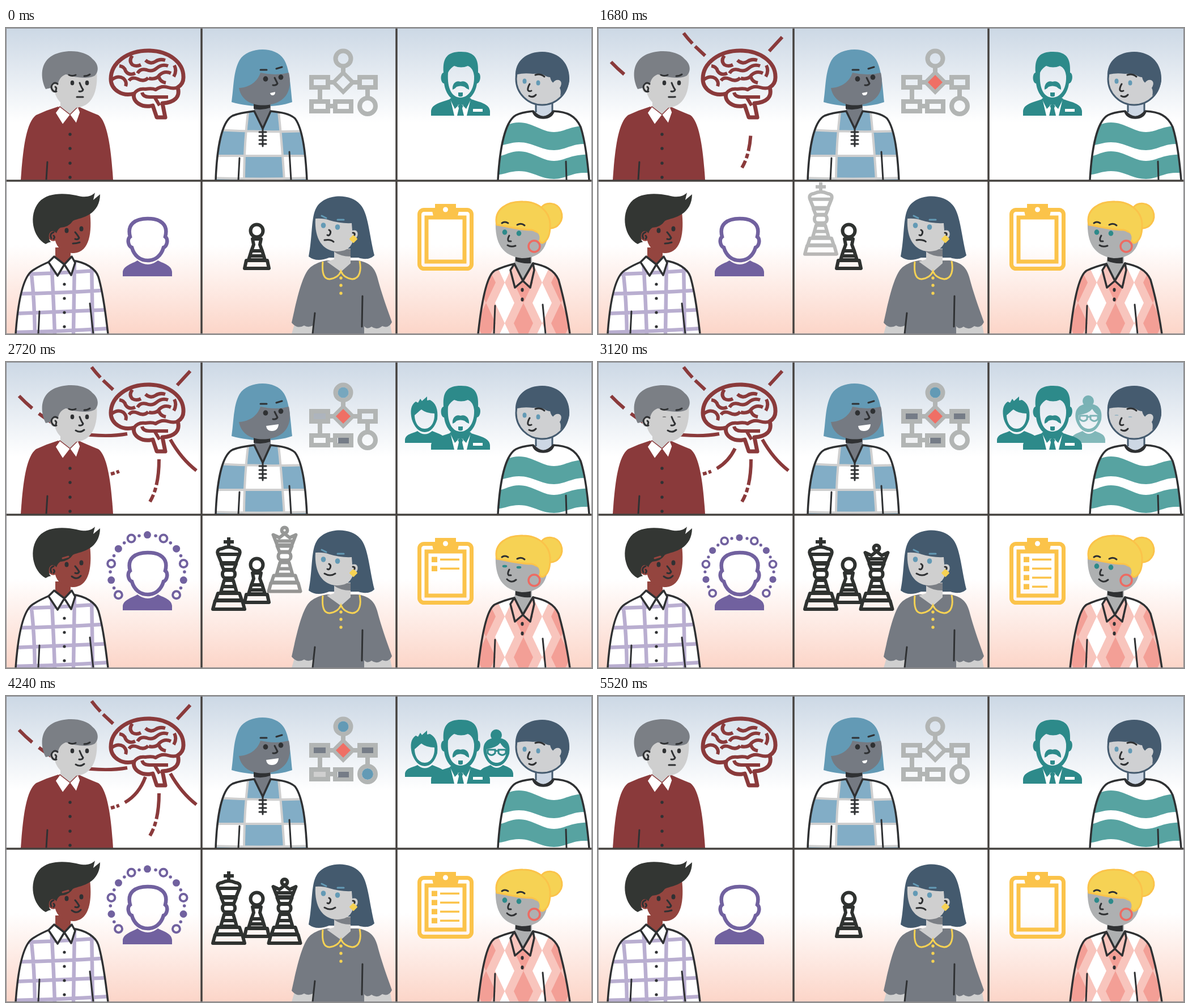
Recreate the animation shown at these times as an HTML page. Size 1034 px wide and 541 px high, loop 5760 ms.

```html
<!DOCTYPE html>
<html lang="en">
<head>
<meta charset="utf-8">
<title>Six people, six ideas</title>
<style>
html, body { margin: 0; width: 100%; height: 100%; overflow: hidden; background: #fff; }
svg { display: block; width: 100%; height: 100%; }
.ink, .outline { fill: none; stroke: #2f3133; stroke-width: 3; stroke-linecap: round; stroke-linejoin: round; }
.outline { stroke-width: 3.5; }
.dark { fill: #2f3133; }
.brain, .ray { fill: none; stroke: #8a3a3b; stroke-width: 6; stroke-linejoin: round; }
.flow { fill: none; stroke: #b2b5b4; stroke-width: 8; }
.teal { fill: #2d8a8a; fill-rule: evenodd; }
.white { fill: #fff; }
.piece { fill: none; stroke: #2f3230; stroke-width: 6; stroke-linejoin: round; }
.gold { fill: #fbc34a; }
</style>
</head>
<body>
<svg viewBox="0 0 1034 541" preserveAspectRatio="none">
<defs>
  <linearGradient id="sky" x2="0" y2="1"><stop stop-color="#ccd8e5"/><stop offset=".62" stop-color="#fff"/></linearGradient>
  <linearGradient id="glow" x2="0" y2="1"><stop offset=".42" stop-color="#fff"/><stop offset="1" stop-color="#fcd5c8"/></linearGradient>
  <pattern id="argyle" width="66" height="72" patternUnits="userSpaceOnUse" x="847" y="450">
    <path fill="#f8c5bd" d="M0 0H66V72H0Z"/>
    <path fill="#fff" d="M33 0L50 36 33 72 16 36Z"/>
    <path fill="#f39f96" d="M0 -36L17 0 0 36-17 0ZM66 -36L83 0 66 36 49 0ZM0 36L17 72 0 108-17 72ZM66 36L83 72 66 108 49 72Z"/>
  </pattern>
  <path id="tunic" d="M370 269C372 215 380 165 400 155C413 150 430 148 438 147L453 178 467 147C485 149 500 151 510 160C525 180 529 230 531 269"/>
  <path id="jumper" d="M868 269C871 215 880 165 900 154C910 149 922 148 930 147Q948 168 966 147C990 148 1005 155 1014 175C1022 200 1027 245 1029 269"/>
  <path id="shirt" d="M17 541C21 485 30 438 48 428C60 420 72 415 82 411L103 418 117 411C140 414 158 425 163 440C172 470 177 515 180 541"/>
  <path id="blouse" d="M833 541C839 485 848 438 862 429C875 423 888 419 897 417L912 447 930 416C950 420 967 427 975 445C985 480 992 520 995 541"/>
  <clipPath id="inTunic"><use href="#tunic"/></clipPath>
  <clipPath id="inJumper"><use href="#jumper"/></clipPath>
  <clipPath id="inShirt"><use href="#shirt"/></clipPath>
</defs>

<rect width="1034" height="270" fill="url(#sky)"/>
<rect y="270" width="1034" height="271" fill="url(#glow)"/>

<!-- brain -->
<g id="rays"></g>
<g class="brain">
  <path stroke-width="7" d="M226 116C205 122 185 109 185 90C185 61 215 40 251 40C286 40 314 60 313 88Q313 99 303 105C308 122 297 132 276 133L281 158H266L259 137C241 142 222 131 226 116Z"/>
  <path d="M187 91Q198 83 207 89Q214 95 211 103M200 67Q209 68 211 76Q217 85 228 80M223 49Q216 58 223 65Q230 69 238 65M217 93Q222 86 232 90Q244 96 251 88M232 80Q237 71 248 74Q258 78 266 71Q275 63 286 67M246 57Q255 65 264 59Q271 54 281 57M252 89Q265 92 271 83Q280 75 291 80M270 87Q272 95 282 97M297 66Q302 76 296 86M226 116Q233 106 246 108Q258 106 264 109Q275 101 286 105Q296 108 303 105M240 114Q242 122 253 122H286M262 122L271 137"/>
</g>

<!-- man in red cardigan -->
<path fill="#cfcfcf" d="M96 130H129V150L113 156 96 146Z"/>
<path fill="#8a3a3b" d="M26 269C30 215 35 168 53 154Q72 145 92 139L113 154 128 139Q143 146 163 154C180 166 186 220 189 269Z"/>
<path fill="#fff" stroke="#8a3a3b" stroke-width="1.5" d="M95 139L87 150 100 171 113 154 124 169 131 149 127 139 113 153Z"/>
<path class="ink" d="M73 237L71 269"/>
<g class="dark"><circle cx="113" cy="188" r="2.7"/><circle cx="113" cy="213" r="2.7"/><circle cx="113" cy="239" r="2.7"/><circle cx="113" cy="264" r="2.7"/></g>
<path fill="#cfcfcf" d="M82 85L160 76C163 112 152 141 121 141C104 141 91 131 86 114C76 116 75 97 86 95Z"/>
<path fill="#7b7f85" d="M70 108C60 88 60 60 83 48C105 37 140 39 153 55C164 64 164 77 157 84C147 90 125 89 106 82C98 84 93 91 92 99C86 93 79 97 79 106Z"/>
<path class="ink" d="M91 99C85 94 78 101 81 108Q84 114 89 112M87 104Q90 106 88 110M111 83Q117 86 123 83M138 85Q144 85 148 82M130 97Q133 105 136 109Q135 113 129 112"/>
<g class="dark" id="eyes1"><ellipse cx="117" cy="97" rx="3.3" ry="4.3"/><ellipse cx="143" cy="97" rx="3.3" ry="4.3"/></g>
<path class="ink" id="mouth1"/>

<!-- woman with blue bob -->
<path fill="#639ab5" d="M398 131C402 103 401 77 412 57C426 33 475 31 490 55C500 70 502 100 505 131C474 142 430 140 398 131Z"/>
<path fill="#757a82" d="M438 130H467V148L453 179 438 148Z"/>
<path class="dark" d="M437 132H466V141Q452 146 437 143Z"/>
<path fill="#757a82" d="M411 106C431 105 444 94 449 79Q476 85 499 79C504 101 500 121 480 131C461 140 418 142 411 106Z"/>
<use href="#tunic" class="white"/>
<g clip-path="url(#inTunic)">
  <path fill="#82adc6" d="M427 140H481L485 184 423 182ZM365 180L423 182 421 226H365ZM485 184L535 182V226H489ZM421 226H489L491 266H420ZM365 265H420V271H365ZM491 265H535V271H491Z"/>
  <path fill="none" stroke="#cfcfcf" stroke-width="4" d="M428 140Q420 205 420 270M480 140Q486 190 491 270M370 180Q450 185 530 182M365 226H535M365 265Q450 268 535 265"/>
</g>
<use href="#tunic" class="outline"/>
<path class="ink" d="M453 178V209M447 184H459M447 191H459M447 198H459M447 205H459M412 230L410 269M500 219L503 269M449 74L460 74M477 72L487 69"/>
<path class="ink" stroke-width="2" d="M474 88Q477 94 479 98Q477 102 471 101"/>
<g class="dark" id="eyes2"><ellipse cx="458" cy="90" rx="4.4" ry="4.7"/><ellipse cx="485" cy="87" rx="4.4" ry="4.7"/></g>
<path class="white" id="grin"/>

<!-- flowchart -->
<g class="flow">
  <path d="M595 70V82M572 96H580M610 96H622M554 108V128M571 138H580M638 108V124"/>
  <circle cx="595" cy="54" r="13.5"/><circle cx="638" cy="138" r="14"/>
  <path d="M539 87h29v18h-29zM624 87h28v18h-28zM539 130h29v17h-29zM581 130h28v17h-28z"/>
  <path stroke-width="7" d="M595 79L612 96 595 113 578 96Z"/>
</g>
<path id="fillDiamond" fill="#ef6f65" d="M595 83L608 96 595 109 582 96Z"/>
<g fill="#757c87">
  <path id="fillMid" d="M586 134h19v10h-19z"/><path id="fillLeft" d="M543 91h21v10h-21z"/><path id="fillRight" d="M628 91h20v10h-20z"/>
</g>
<path id="fillLow" fill="#cfcfcf" d="M543 134h21v9h-21z"/>
<g fill="#639ab5"><circle id="fillTop" cx="595" cy="54" r="9.5"/><circle id="fillRound" cx="638" cy="138" r="10"/></g>

<!-- portraits -->
<g id="youth" class="teal">
  <path d="M704 143V137C706 127 716 127 726 122Q739 133 752 122C763 127 773 128 774 137V143Z"/>
  <path d="M716 101C713 87 714 76 723 70L727 72 731 65 734 69 743 61 743 68 748 67C758 72 763 83 761 101C757 115 749 124 739 124C728 124 720 114 716 101ZM721 94C727 89 731 85 733 84Q742 91 756 91C757 107 749 118 739 118C728 118 721 107 721 94Z"/>
</g>
<g id="lady" class="teal">
  <path d="M835 143V136C837 127 849 125 855 122Q866 132 877 122C887 126 894 128 895 137V143Z"/>
  <circle cx="865" cy="69" r="10"/>
  <path d="M843 101C840 82 850 74 866 74C882 74 891 83 888 102C884 115 876 124 866 124C855 124 846 114 843 101ZM848 94Q866 91 872 83Q877 91 883 94C884 108 876 118 866 118C855 118 848 108 848 94Z"/>
  <path fill="none" stroke="#2d8a8a" stroke-width="3" d="M850 95H863V101Q857 108 850 101ZM869 95H882V101Q876 108 869 101ZM863 97H869"/>
</g>
<g class="teal">
  <path d="M750 155V147C751 135 765 132 783 126H821C840 132 853 135 854 147V155Z"/>
  <path class="white" d="M784 125L802 137 820 125 813 155H791ZM824 143h17v5h-17z"/>
  <path d="M783 125L790 122 800 135 792 143ZM821 125L814 122 804 135 812 143ZM797 136H807L805 142 808 155H796L799 142Z"/>
  <path d="M773 98C766 97 766 80 772 79C770 52 779 42 803 42C828 42 834 55 833 79C839 80 838 97 831 98C828 119 815 130 802 130C788 130 776 119 773 98ZM780 79C783 72 789 68 791 67Q803 72 815 67C822 70 825 76 826 85C827 109 815 123 802 123C788 123 778 109 780 79Z"/>
  <path d="M788 109C787 97 795 92 802 95C809 92 818 97 817 109Q812 107 809 104Q802 101 795 104Q792 108 788 109ZM798 114H806V120Q802 123 798 120Z"/>
</g>

<!-- man in wavy jumper -->
<path fill="#cdd7e4" d="M935 128H964V151Q949 162 935 151Z"/>
<path fill="none" stroke="#455b6f" stroke-width="3" d="M935 133V149M964 133V149"/>
<use href="#jumper" class="white"/>
<g clip-path="url(#inJumper)" fill="#57a3a1">
  <path id="wave" d="M860 178C878 176 888 167 905 167C930 167 945 184 967 184C988 184 995 171 1035 173V206C1000 201 990 216 967 216C943 216 930 202 905 202C888 202 878 209 860 209Z"/>
  <use href="#wave" y="51"/>
</g>
<use href="#jumper" class="outline"/>
<path class="outline" d="M930 148Q934 159 948 159T966 148"/>
<path class="ink" d="M988 236L989 269"/>
<circle cx="946" cy="90" r="46" fill="#cfd0d2" stroke="#455b6f" stroke-width="3"/>
<path fill="#455b6f" d="M899 87C897 57 920 42 946 42C977 42 996 64 994 94C992 107 986 114 978 120Q980 111 977 106C986 92 971 87 966 97Q962 95 960 87Q955 87 949 83Q940 80 930 81Q914 79 902 82Z"/>
<path fill="#cfd0d2" d="M965 97C971 87 983 94 978 104Q973 110 966 107Z"/>
<path class="ink" d="M934 83Q943 80 950 86M924 99Q920 106 921 110Q923 113 927 111M923 120Q930 124 935 118"/>
<g fill="#639ab5" id="eyes3"><ellipse cx="915" cy="94" rx="3.5" ry="4.5"/><ellipse cx="939" cy="97" rx="3.5" ry="4.5"/></g>

<!-- man in checked shirt -->
<path fill="#94453f" d="M87 388H114V409L103 421 87 410Z"/>
<use href="#shirt" class="white"/>
<path clip-path="url(#inShirt)" fill="none" stroke="#b9aed0" stroke-width="6.5" d="M43 420Q50 470 51 541M80 410Q84 480 86 541M121 410Q120 480 119 541M151 410Q152 480 153 541M15 436Q90 434 185 427M15 470Q90 469 185 463M15 505Q90 502 185 498M15 538Q90 537 185 531"/>
<use href="#shirt" class="outline"/>
<path class="outline" style="fill:#fff" d="M85 404L75 414 91 438 103 418 115 437 122 415 116 404 103 418Z"/>
<path class="ink" d="M59 501L57 541M148 487L154 541"/>
<g class="dark"><circle cx="103" cy="453" r="2.6"/><circle cx="103" cy="478" r="2.6"/><circle cx="103" cy="503" r="2.6"/><circle cx="103" cy="528" r="2.6"/></g>
<path fill="#94453f" d="M86 335L148 325C152 360 148 396 120 398C101 398 90 389 87 376C77 380 69 366 76 358Z"/>
<path fill="#333633" d="M70 382C47 370 39 331 58 308C74 290 104 292 124 296C141 301 152 297 157 291L154 304 166 294C166 310 159 322 148 329C138 336 126 337 118 341Q111 352 96 353Q91 356 89 363C83 355 74 360 76 372Q77 378 80 378Q74 379 70 382Z"/>
<path class="ink" d="M84 361Q76 364 80 372M84 367Q87 370 84 373M122 361Q127 367 129 371Q127 375 122 373"/>
<path id="brow4" class="ink" style="stroke:#94453f" d="M100 347L110 344"/>
<g class="dark" id="eyes4"><ellipse cx="107" cy="358" rx="3.5" ry="4.6"/><ellipse cx="133" cy="355" rx="3.5" ry="4.6"/></g>
<path class="ink" id="mouth4"/>

<!-- silhouette with halo -->
<g id="halo" fill="#71619f" stroke="#71619f"></g>
<path fill="#71619f" d="M206 439V431C208 420 222 417 232 411Q250 425 268 411C280 417 292 420 293 431V439Z"/>
<path fill="none" stroke="#71619f" stroke-width="6.5" d="M219 369C213 347 228 337 250 337C272 337 287 347 281 369C287 374 284 386 278 388C274 402 264 411 250 411C236 411 226 402 222 388C216 386 213 374 219 369Z"/>

<!-- chess -->
<g class="piece">
  <path d="M435 373H450L448 383 452 394H433L437 383Z"/>
  <path d="M433 394H452L457 410H428ZM424 411H461L464 425H421Z"/>
  <path d="M431 403H454"/>
  <circle cx="442.500" cy="358.500" r="11"/>
</g>
<g id="king" class="piece"></g>
<g id="queen" class="piece"></g>

<!-- woman in grey dress -->
<path fill="#445a6e" d="M534 404C541 370 538 333 548 317C561 294 606 290 625 312C639 326 641 366 650 402C642 410 630 409 622 406H570Q548 415 534 404Z"/>
<path fill="#cfcfcf" d="M510 520L504 541H543V520ZM631 520V541H681L677 520Z"/>
<path fill="#757a82" d="M504 521C514 475 524 430 540 421C550 414 560 412 566 411H620C640 414 650 422 655 440C664 474 674 500 681 520Q675 532 664 527Q654 535 645 528Q637 534 632 527V541H541L543 525Q535 531 526 526Q514 533 504 521Z"/>
<path fill="#cfcfcf" d="M579 390H608V416L591 431 566 413 579 409Z"/>
<path fill="#7b7f85" d="M576 391H608V404Q590 404 578 395Z"/>
<path fill="#cfcfcf" d="M546 337Q560 336 571 340Q590 346 610 345L611 358C623 354 624 371 613 374C609 389 600 395 583 395C559 394 544 373 546 337Z"/>
<path fill="none" stroke="#f6d254" stroke-width="3" d="M559 413C557 434 561 444 571 444Q586 442 591 430Q596 442 611 444C625 443 627 427 624 412"/>
<g fill="#f6d254"><circle cx="591" cy="442" r="2.7"/><circle cx="591" cy="455" r="2.7"/><circle cx="591" cy="469" r="2.7"/><path d="M613 367L619 373 613 379 607 373Z" stroke="#f6d254" stroke-width="2" stroke-linejoin="round"/></g>
<path class="ink" d="M545 504L541 541M629 474L628 528M570 357Q574 359 572 364Q570 368 567 366M612 362Q616 362 615 366"/>
<path class="ink" style="stroke:#639ab5" d="M557 332L565 336M585 339H596"/>
<g fill="#639ab5" id="eyes5"><ellipse cx="560" cy="349" rx="4.300" ry="4.800"/><ellipse cx="585" cy="352" rx="4.300" ry="4.800"/></g>
<path class="ink" id="mouth5"/>

<!-- clipboard -->
<g fill="none" stroke="#fbc34a" stroke-width="7">
  <rect x="729.500" y="321.500" width="92" height="104" rx="8"/><path d="M742 335H809V413H742Z"/>
</g>
<path class="gold" d="M757 311H794V319H800L796 337H755L751 319H757Z"/>
<circle cx="775.500" cy="321" r="4.500" class="white"/>
<g id="list" class="gold"></g>

<!-- woman in argyle -->
<path fill="#aeb0b1" d="M899 400H928V418L912 448 897 418Z"/>
<path class="dark" d="M899 402L926 405V416Q910 417 899 412Z"/>
<use href="#blouse" fill="url(#argyle)"/>
<use href="#blouse" class="outline"/>
<path class="outline" style="fill:#f8c5bd" d="M897 417L890 428 898 459 912 447 925 459 932 428 930 416 912 447Z"/>
<path class="ink" d="M863 491L861 541M947 489L952 541"/>
<g class="dark"><ellipse cx="911" cy="463" rx="2.600" ry="3.400"/><ellipse cx="911" cy="480" rx="2.600" ry="3.400"/></g>
<path fill="#aeb0b1" d="M864 340H956C960 385 946 407 910 407C876 403 862 381 864 340Z"/>
<g fill="#f6d254" stroke="#fbc34a" stroke-width="3">
  <path d="M944 318C952 307 972 307 979 323C986 340 973 356 957 354Z"/>
  <path d="M866 348C860 321 884 306 912 307C941 307 961 326 960 350C960 365 956 376 947 380Q941 381 940 369Q938 359 928 357C905 357 886 351 866 348Z"/>
</g>
<path fill="#aeb0b1" d="M926 367C931 356 944 362 941 374Q937 382 929 379Z"/>
<circle cx="932" cy="386" r="10" fill="none" stroke="#ed6b62" stroke-width="3.500"/>
<path class="ink" d="M875 345Q880 341 886 345M902 348Q909 344 915 349M888 367Q884 374 887 377L891 377"/>
<g class="teal" id="eyes6"><ellipse cx="880" cy="361" rx="4.300" ry="4.700"/><ellipse cx="905" cy="363" rx="4.300" ry="4.700"/></g>
<path class="ink" id="mouth6"/>

<!-- frames -->
<path stroke="#45423f" stroke-width="3.500" d="M345 0V541M689 0V541M0 270H1034"/>
<path fill="none" stroke="#85858a" d="M.5 .5H1033.500V540.500H.5Z"/>
</svg>

<script>
const LOOP = 5760, STEP = 80, HOLD = 240;
const $ = id => document.getElementById(id);
const clamp = v => Math.max(0, Math.min(1, v));
const ramp = (t, a, b) => clamp((t - a) / (b - a));
const ease = p => (1 - Math.cos(Math.PI * p)) / 2;
const mix = (a, b, p) => a.map((v, i) => v + (b[i] - v) * p);
const pulse = (t, [a, b, c, d, ...rest]) =>
  ramp(t, a, b) * (1 - ramp(t, c, d)) + (rest.length ? pulse(t, rest) : 0);

// path, visible stretches in percent, start, end
const rays = [
  ['M325 16L302 41', [[0, 100]], 640, 1040],
  ['M189 49L171 32Q160 21 151 9', [[0, 44], [56, 100]], 880, 1300],
  ['M254 247Q270 220 270 172', [[0, 18], [24, 35], [41, 100]], 1160, 1840],
  ['M23 60Q42 80 62 94Q105 127 150 129Q185 132 214 127', [[0, 15], [22, 100]], 1520, 2300],
  ['M336 192Q309 171 290 137', [[0, 100]], 2040, 2560],
  ['M185 198Q230 187 246 143', [[0, 8], [12, 18], [31, 100]], 2560, 3200]
].map(([d, parts, from, to]) => {
  $('rays').insertAdjacentHTML('beforeend', `<path class="ray" pathLength="100" d="${d}"/>`);
  return { path: $('rays').lastChild, parts, from, to };
});

// fade in from, to; fade out from, to
const fades = {
  fillDiamond: [960, 1440, 4720, 5200], fillMid: [1680, 2080, 4720, 5200],
  fillTop: [2320, 2800, 4720, 5200], fillLeft: [2480, 2960, 4720, 5200],
  fillRight: [1840, 2240, 2240, 2640, 2720, 3120, 4720, 5200],
  fillLow: [3040, 3520, 4720, 5200],
  fillRound: [3280, 3760, 4720, 5200], rays: [0, 1, 4480, 4880],
  youth: [2160, 2600, 4290, 4700], lady: [2800, 3360, 4540, 4940],
  halo: [2020, 2480, 4540, 4940], king: [1520, 2000, 4320, 4750],
  queen: [2400, 3040, 4600, 5000], list: [2160, 2161, 4720, 5120],
  brow4: [1760, 2000, 5000, 5200]
};

const blinks = { 1: [3120], 2: [4880], 3: [800, 3120], 4: [1280, 3680], 5: [560, 4960], 6: [1280, 2640] };
for (const n in blinks) for (const e of $('eyes' + n).children) e.dataset.ry = e.getAttribute('ry');

// resting curve, smiling curve, timing
const mouths = {
  1: [[125, 122, 131, 122, 136, 122], [123, 121, 131, 126, 138, 120], [1600, 2000, 4880, 5280]],
  4: [[118, 381, 124, 381, 130, 379], [116, 379, 125, 386, 132, 378], [2240, 2640, 5120, 5520]],
  5: [[562, 375, 573, 373, 578, 378], [562, 374, 572, 380, 581, 374], [1600, 2000, 5120, 5520]],
  6: [[885, 384, 891, 388, 899, 385], [884, 384, 892, 392, 900, 385], [2240, 2640, 5120, 5520]]
};
const grin = [[466, 115, 475, 113, 475, 119, 470, 119], [459, 113, 481, 110, 480, 122, 469, 122]];

const tower = x => `<g transform="translate(${x})"><path d="M-8 386H8L14 407H-14ZM-19 409H19L23 421H-23ZM-24 422H24L28 437H-28Z"/>
  <path d="M-11 397H11"/><rect x="-11" y="368" width="22" height="14" rx="6"/><path d="M-13 357H13L9 367H-9Z"/>`;
$('king').innerHTML = tower(393) + '<path d="M0 310V327M-9 318H9"/><path d="M-19 340Q-22 331 -12 330Q0 324 12 330Q22 331 19 340L13 355H-13ZM-18 340H18"/></g>';
$('queen').innerHTML = tower(491.5) + '<circle cy="329" r="5"/><path d="M-20 337L-9 342 0 335 9 342 20 337 13 355H-13ZM-14 348H14"/></g>';

$('halo').innerHTML = Array.from({ length: 21 }, (_, i) => {
  const a = (i - 10) * 12.86 * Math.PI / 180, x = 65.5 * Math.sin(a), y = -65.5 * Math.cos(a);
  const ring = i % 4 === 0;
  return `<circle cx="${x}" cy="${y}" r="${i % 2 ? 2.8 : 6.5}" ${ring ? 'fill="none" stroke-width="4"' : 'stroke="none"'}/>`;
}).join('');

const haloRadius = [[2080, 61], [2680, 65.5], [3480, 57], [4160, 65.5], [4640, 61], [5000, 57]];
function haloScale(t) {
  let r = 61;
  haloRadius.forEach(([at, v], i) => {
    const next = haloRadius[i + 1];
    if (t >= at) r = next ? v + (next[1] - v) * ease(ramp(t, at, next[0])) : v;
  });
  return r / 65.5;
}

for (let i = 0; i < 4; i++) {
  const y = 344.5 + 16 * i;
  $('list').insertAdjacentHTML('beforeend', `<g><rect x="751" y="${y}" width="10" height="9.500"/><rect x="766" y="${y + 3}" width="34" height="3.500"/></g>`);
}

function dash(parts, shown) {
  const out = [0];
  let at = 0;
  for (const [a, b] of parts) {
    if (a >= shown) break;
    const end = Math.min(b, shown);
    out.push(a - at, end - a);
    at = end;
  }
  return [...out, 200].join(' ');
}

function render(t) {
  for (const id in fades) $(id).setAttribute('opacity', pulse(t, fades[id]));
  for (const { path, parts, from, to } of rays) {
    const p = ramp(t, from, to);
    path.style.display = p ? '' : 'none';
    path.setAttribute('stroke-dasharray', dash(parts, p * 100));
  }
  for (const n in blinks) {
    const open = Math.min(1, ...blinks[n].map(at => Math.max(.12, Math.abs(t - at) / 160)));
    for (const e of $('eyes' + n).children) e.setAttribute('ry', e.dataset.ry * open);
  }
  for (const n in mouths) {
    const [rest, smile, times] = mouths[n];
    const [x, y, ...c] = mix(rest, smile, ease(pulse(t, times)));
    $('mouth' + n).setAttribute('d', `M${x} ${y}Q${c}`);
  }
  const [x, y, u, v, a, b, c, d] = mix(...grin, ease(pulse(t, [1600, 2240, 4880, 5280])));
  $('grin').setAttribute('d', `M${x} ${y}L${u} ${v}Q${a} ${b} ${c} ${d}Q${x + 1} ${d} ${x} ${y}Z`);
  const drop = (id, from, to) => $(id).setAttribute('transform', `translate(0 ${-42 * (1 - ramp(t, from, to) ** 2)})`);
  drop('king', 1520, 2000);
  drop('queen', 2400, 3040);
  $('halo').setAttribute('transform', `translate(249.5 371) scale(${haloScale(t)})`);
  [...$('list').children].forEach((row, i) => {
    const p = ramp(t, 2240 + 240 * i, 2440 + 240 * i);
    row.firstChild.setAttribute('opacity', Math.min(1, p * 2));
    row.lastChild.setAttribute('width', 34 * p);
  });
}

const start = performance.now();
function tick(now) {
  const t = Math.floor(Math.max(0, now - start) % LOOP / STEP) * STEP;
  render(t < HOLD ? 0 : t);
  requestAnimationFrame(tick);
}
render(0);
requestAnimationFrame(tick);
</script>
</body>
</html>
```
